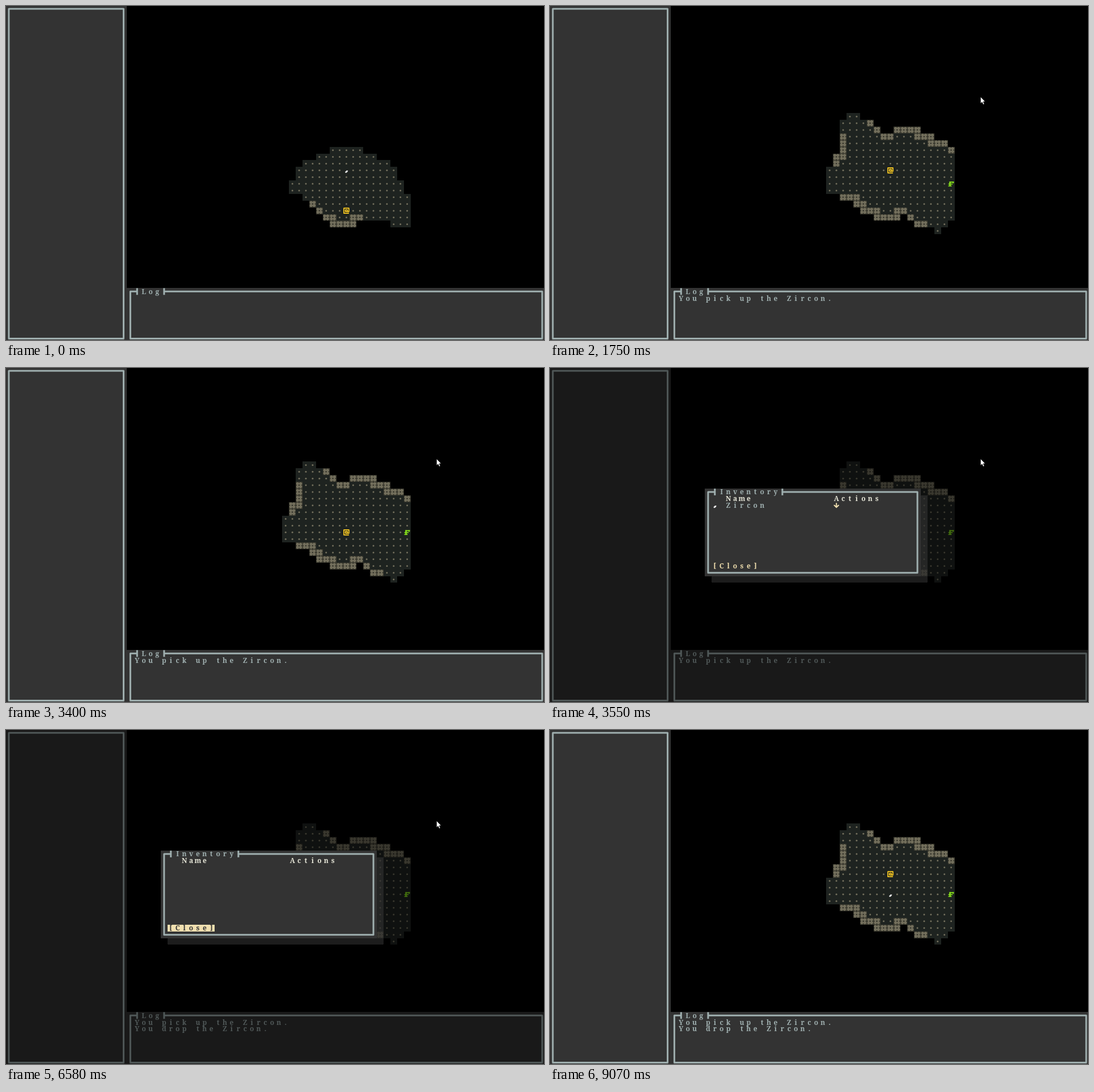
Recreate the animation shown at these times as an HTML page with a canvas. Size 949 by 590 pixels, loop 9100 ms.

```html
<!DOCTYPE html>
<html lang="en">
<head>
<meta charset="utf-8">
<title>Cave crawler</title>
<style>
html, body { margin: 0; width: 100%; height: 100%; overflow: hidden; background: #000; }
canvas { display: block; }
</style>
</head>
<body>
<canvas id="stage" width="949" height="590"></canvas>
<script>
const ctx = document.getElementById('stage').getContext('2d');
const LOOP = 9100, CW = 11.91, CH = 11.89;
const PANEL = '#333333', LINE = '#9fafaf', HEAD = '#e6e6d8', ACCENT = '#f0dfaf';
const FLOOR = '#1e2320', STONE = '#75715e', WALL = '#3e3d32';
const GOLD = '#ffcd22', LIME = '#85dd1b', GEM = '#eeeeee';
const LEFT = 41, TOP = 17, HERO = 50;

const full = '.'.repeat(19);
const cave = [
  '   ..',
  '  ....#',
  '  .....#  ####',
  '  #.....##...###',
  '  #............###',
  '  #...............#',
  ' ##................',
  ' #.................',
  full, full, full, full,
  '  ###..............',
  '    ##.............',
  '     ###..##.......',
  '       #### #......',
  '             ##...',
  '                .'
];

// time, row in the cave, rows scrolled
const moves = [
  [0, 30, 0], [430, 29, 0], [580, 28, 0], [730, 27, 0], [880, 26, 0],
  [1000, 25, 0], [1150, 24, 0], [1660, 25, 1], [3250, 26, 2], [3400, 27, 3],
  [7120, 26, 3], [8140, 25, 3], [8320, 24, 3]
];

const px = c => c * CW - 1;
const py = r => r * CH - 1;
const tile = (c, r) => (cave[r - TOP] || '')[c - LEFT] || ' ';

// First time each cell is seen, by rays cast to a circle
const seen = {};
const toward = v => Math.sign(v) * Math.ceil(Math.abs(v) - 0.5);
function look(time, row) {
  const see = (c, r) => { seen[c + ',' + r] ??= time; };
  see(HERO, row);
  for (let dy = -9; dy <= 9; dy++) for (let dx = -9; dx <= 9; dx++) {
    const d = dx * dx + dy * dy;
    if (d <= 60 || d > 85) continue;
    const n = Math.max(Math.abs(dx), Math.abs(dy));
    for (let i = 1; i <= n; i++) {
      const c = HERO + toward(dx * i / n), r = row + toward(dy * i / n);
      see(c, r);
      if (tile(c, r) !== '.') break;
    }
  }
}
moves.slice(0, 7).forEach(([time, row]) => look(time, row));
const isSeen = (c, r, t) => t >= Math.min(1150, seen[c + ',' + r] ?? 1150);

function box(x, y, w, h, color) {
  ctx.fillStyle = color;
  ctx.fillRect(x, y, w, h);
}

function cells(c, r, w, h, color) {
  const x = Math.round(px(c)), y = Math.round(py(r));
  box(x, y, Math.round(px(c + w)) - x, Math.round(py(r + h)) - y, color);
}

function poly(points, x, y, color) {
  ctx.beginPath();
  points.forEach(([a, b]) => ctx.lineTo(x + a, y + b));
  ctx.closePath();
  ctx.fillStyle = color;
  ctx.fill();
}

function write(str, c, r, color) {
  ctx.font = 'bold 12px "Noto Serif", "Liberation Serif", serif';
  ctx.textAlign = 'center';
  ctx.textBaseline = 'alphabetic';
  ctx.fillStyle = color;
  [...str].forEach((ch, i) => ctx.fillText(ch, px(c + i + 0.5), py(r) + 10.3));
}

function panel(c, r, w, h, title) {
  cells(c, r, w, h, PANEL);
  ctx.strokeStyle = LINE;
  ctx.lineWidth = 3;
  ctx.lineJoin = 'round';
  ctx.strokeRect(px(c + 0.5), py(r + 0.5), (w - 1) * CW, (h - 1) * CH);
  if (!title) return;
  const a = px(c + 1.5), b = px(c + title.length + 2.5), y = py(r);
  box(a, y, b - a, CH, PANEL);
  box(a - 1.5, y, 3, CH, LINE);
  box(b - 1.5, y, 3, CH, LINE);
  write(title, c + 2, r, LINE);
}

function gem(c, r) {
  poly([[3.5, 9], [6.2, 6.2], [9, 6.5], [7.3, 9.4], [4.6, 10.6]], px(c), py(r), GEM);
}

function hero(c, r) {
  ctx.save();
  ctx.translate(px(c), py(r));
  ctx.strokeStyle = GOLD;
  ctx.lineWidth = 1.7;
  ctx.lineJoin = 'round';
  ctx.strokeRect(4.3, 4.3, 3.4, 3.2);
  ctx.beginPath();
  [[7.7, 7.6], [10.4, 7.6], [10.4, 1.5], [1.5, 1.5], [1.5, 10.5], [10.4, 10.5]]
    .forEach(p => ctx.lineTo(...p));
  ctx.stroke();
  ctx.restore();
}

function fungus(c, r) {
  const x = px(c), y = py(r);
  box(x + 3, y + 2, 7.6, 2, LIME);
  box(x + 8.6, y + 2, 2, 3, LIME);
  box(x + 2.6, y + 2, 2.6, 8, LIME);
  box(x + 1, y + 5.5, 7.4, 1.8, LIME);
  box(x + 0.8, y + 9, 6, 1.6, LIME);
}

function wall(c, r) {
  cells(c, r, 1, 1, WALL);
  const x = px(c), y = py(r);
  for (const o of [2, 7.2]) {
    box(x + o, y + 0.8, 2.5, 10.4, STONE);
    box(x + 0.8, y + o, 10.4, 2.5, STONE);
  }
}

function floor(c, r, bare) {
  cells(c, r, 1, 1, FLOOR);
  if (bare) return;
  ctx.beginPath();
  ctx.arc(px(c + 0.5), py(r + 0.5), 1.5, 0, 7);
  ctx.fillStyle = STONE;
  ctx.fill();
}

function drawCave(t) {
  const [, row, scroll] = moves.findLast(m => t >= m[0]);
  const gemRow = t < 1270 ? 24 : t >= 4810 ? 27 : 0;
  cave.forEach((line, j) => [...line].forEach((ch, i) => {
    const c = LEFT + i, r = TOP + j, y = r - scroll;
    if (ch === ' ' || !isSeen(c, r, t)) return;
    if (ch === '#') return wall(c, y);
    const isHero = c === HERO && r === row;
    const isGem = c === HERO && r === gemRow;
    const isFungus = c === 59 && r === 27;
    floor(c, y, isHero || isGem || isFungus);
    if (isHero) hero(c, y);
    else if (isGem) gem(c, y);
    else if (isFungus) fungus(c, y);
  }));
}

function drawLog(t) {
  panel(18, 42, 62, 8, 'Log');
  const tick = s => Math.floor((t - s) / 30);
  const first = t < 1270 ? 0 : t < 1660 ? 5 : 10 + 4.4 * tick(1660);
  const second = t < 5710 ? 0 : 4 * tick(5710);
  write('You pick up the Zircon.'.slice(0, Math.round(first)), 19, 43, LINE);
  write('You drop the Zircon.'.slice(0, second), 19, 44, LINE);
}

function itemRow(c, r, focus) {
  cells(c, r, 30, 1, PANEL);
  gem(c, r);
  write('Zircon', c + 2, r, LINE);
  if (focus) cells(c + 18, r, 1, 1, ACCENT);
  const ink = focus ? PANEL : ACCENT, x = px(c + 18), y = py(r);
  box(x + 5, y + 1.5, 2, 7, ink);
  poly([[1.3, 5], [3, 5], [6, 7.8], [9, 5], [10.7, 5], [10.7, 6.2], [6, 10.8], [1.3, 6.2]], x, y, ink);
}

function shade(c, r, w, h) {
  const x0 = Math.round(px(c)), y0 = Math.round(py(r));
  const x1 = Math.round(px(c + w)), y1 = Math.round(py(r + h));
  ctx.fillStyle = '#3a3a3a';
  for (let y = y0; y < y1; y++)
    for (let x = x0 + (x0 + y) % 2; x < x1; x += 2) ctx.fillRect(x, y, 1, 1);
}

function drawInventory(t) {
  box(0, 0, 949, 590, 'rgba(0,0,0,0.5)');
  shade(55, 19, 1, 12);
  shade(24, 31, 32, 1);
  panel(23, 18, 32, 13, 'Inventory');
  write('Name', 26, 19, HEAD);
  write('Actions', 42, 19, HEAD);
  const closing = t >= 6580;
  if (closing) cells(24, 29, 7, 1, ACCENT);
  write('[Close]', 24, 29, closing ? PANEL : ACCENT);
  if (t < 4810) itemRow(24, 20, t >= 4210);
  else if (t < 5710) itemRow(0, 1, true);
}

function pointerAt(t) {
  if (t < 100 || t >= 9070) return null;
  if (t < 8440) {
    const u = Math.min(1, Math.floor((t - 100) / 30) / 8);
    const left = (1 - u) ** 1.6;
    return [759.5 + 150 * left, 160.5 - 107 * left];
  }
  const k = t < 8920 ? 0 : Math.floor((t - 8920) / 30) + 1;
  const u = (k / 5) ** 1.4;
  return [767 + 175 * u, 158 - 98 * u];
}

function drawPointer(t) {
  const at = pointerAt(t);
  if (!at) return;
  poly([[0, 0], [0, 11.6], [2.7, 9.2], [4.6, 13.6], [6.6, 12.7], [4.7, 8.5], [8, 8.3]], ...at, '#fff');
  ctx.strokeStyle = '#000';
  ctx.lineWidth = 0.6;
  ctx.stroke();
}

function draw(now) {
  const t = now % LOOP;
  box(0, 0, 949, 590, '#000');
  drawCave(t);
  panel(0, 0, 18, 50);
  drawLog(t);
  if (t >= 3550 && t < 7090) drawInventory(t);
  drawPointer(t);
}

const start = performance.now();
function frame() {
  draw(performance.now() - start);
  requestAnimationFrame(frame);
}
frame();
</script>
</body>
</html>
```
